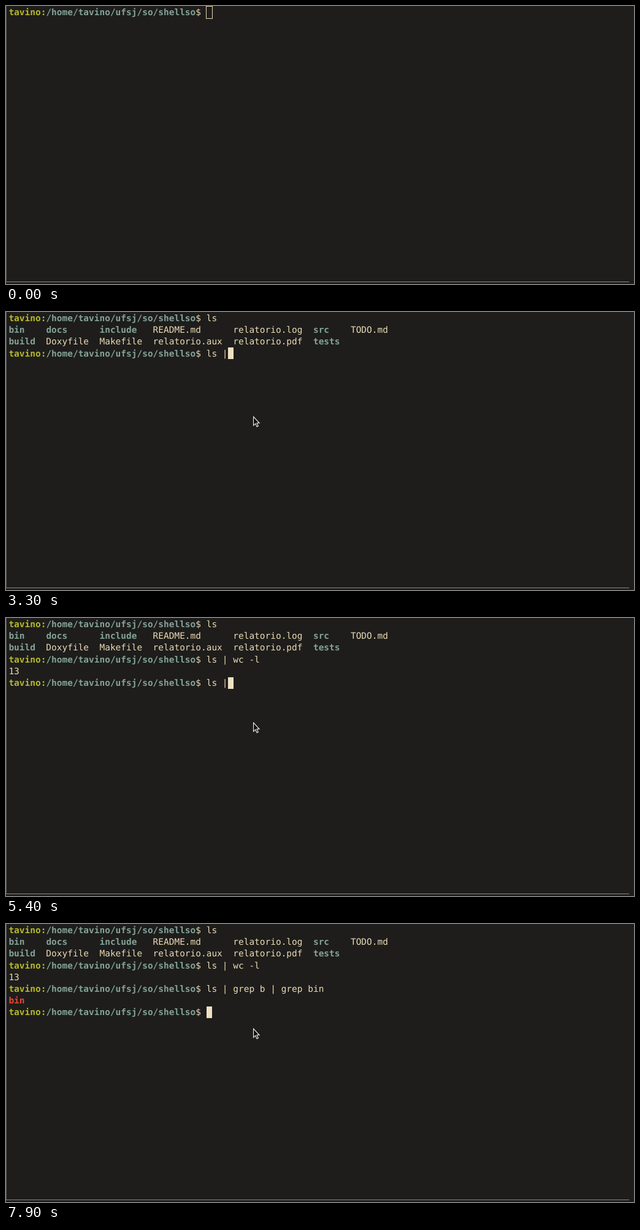
An HTML page that plays this animation: 1024x455 px, repeating every 8000 ms.

```html
<!DOCTYPE html>
<html lang="pt">
<head>
<meta charset="utf-8">
<title>Terminal</title>
<style>
  html, body { margin: 0; width: 100%; height: 100%; overflow: hidden; background: #1e1d1c; }
  #stage { position: relative; width: 1024px; height: 455px; overflow: hidden; }
  #stage > * { position: absolute; }
  pre {
    margin: 0; left: 4.4px; top: 2px; color: #e9dab2;
    font: 14.485px/19.2px "DejaVu Sans Mono", monospace;
    text-rendering: geometricPrecision; font-variant-ligatures: none;
  }
  b { font-weight: 700; }
  .user { color: #b6b928; }
  .dir { color: #83a398; }
  .match { color: #ea4433; }
  #caret { width: 9px; height: 19px; box-sizing: border-box; background: #efe1bf; }
  #caret.hollow { width: 11px; height: 21px; margin: -1px 0 0 -1px; background: none; border: 1px solid #e5d6b0; }
  #left { left: 0; top: 0; width: 1px; height: 452px; background: #5c5b5a; }
  #bottom { left: 0; top: 451px; width: 1016px; height: 1px; background: #8a8988; }
  #mouse { left: 0; top: 0; }
</style>
</head>
<body>
<div id="stage">
  <div id="left"></div>
  <div id="bottom"></div>
  <div id="caret"></div>
  <pre id="screen"></pre>
  <svg id="mouse" width="14" height="20">
    <path d="M1 1V15.4L4.2 12.4L6.6 17.5L8.8 16.5L6.5 11.5H10.6Z" fill="#111" stroke="#eee" stroke-width="1.1"/>
  </svg>
</div>
<script>
const LOOP = 8000, STEP = 100;
const CELL = 8.7207, LINE = 19.2, PROMPT_COLS = 37;
const bold = (kind, text) => `<b class="${kind}">${text}</b>`;
const dir = text => bold('dir', text);
const prompt = bold('user', 'tavino:') + dir('/home/tavino/ufsj/so/shellso') + '$ ';

// Each key is [time, typed text]; output appears on enter.
const commands = [
  {
    keys: [[1100, 'l'], [1200, 's']],
    enter: 1700,
    output: [
      `${dir('bin')}    ${dir('docs')}      ${dir('include')}   README.md      relatorio.log  ${dir('src')}    TODO.md`,
      `${dir('build')}  Doxyfile  Makefile  relatorio.aux  relatorio.pdf  ${dir('tests')}`
    ]
  },
  {
    keys: [[2400, 'l'], [2600, 's'], [2800, ' '], [3200, '|'], [3400, ' '], [3500, 'w'],
           [3700, 'c'], [3800, ' '], [4000, '-'], [4100, 'l']],
    enter: 4300,
    output: ['13']
  },
  {
    keys: [[4800, 'l'], [4900, 's'], [5100, ' '], [5400, '|'], [5500, ' '], [5600, 'g'],
           [5700, 're'], [5800, 'p'], [5900, ' '], [6300, 'b'], [6600, ' '], [6800, '|'],
           [7000, ' '], [7100, 'g'], [7200, 'r'], [7300, 'e'], [7400, 'p '],
           [7500, 'b'], [7600, 'i'], [7700, 'n']],
    enter: 7800,
    output: [bold('match', 'bin')]
  }
];

const [screen, caret, mouse] = ['screen', 'caret', 'mouse'].map(id => document.getElementById(id));

function drawTerminal(t) {
  const lines = [];
  let typed = '';
  for (const { keys, enter, output } of commands) {
    typed = keys.filter(([at]) => at <= t).map(([, text]) => text).join('');
    lines.push(prompt + typed);
    if (t < enter) break;
    lines.push(...output);
    typed = '';
  }
  if (t >= commands.at(-1).enter) lines.push(prompt);
  screen.innerHTML = lines.join('\n');
  caret.style.left = 4.4 + (PROMPT_COLS + typed.length) * CELL + 'px';
  caret.style.top = .6 + (lines.length - 1) * LINE + 'px';
  caret.className = t < 500 ? 'hollow' : '';
}

function drawMouse(t) {
  const rest = 1 - Math.min(1, Math.max(0, (t - 200) / 200));
  const away = rest * rest;
  mouse.style.visibility = t < 200 ? 'hidden' : 'visible';
  mouse.style.transform = `translate(${402.5 - 97 * away}px, ${170.3 + 8 * away}px)`;
}

let shown = -1;
function frame() {
  const t = Math.floor(performance.now() % LOOP / STEP) * STEP;
  if (t !== shown) {
    drawTerminal(t);
    drawMouse(t);
    shown = t;
  }
  requestAnimationFrame(frame);
}
frame();
</script>
</body>
</html>
```
